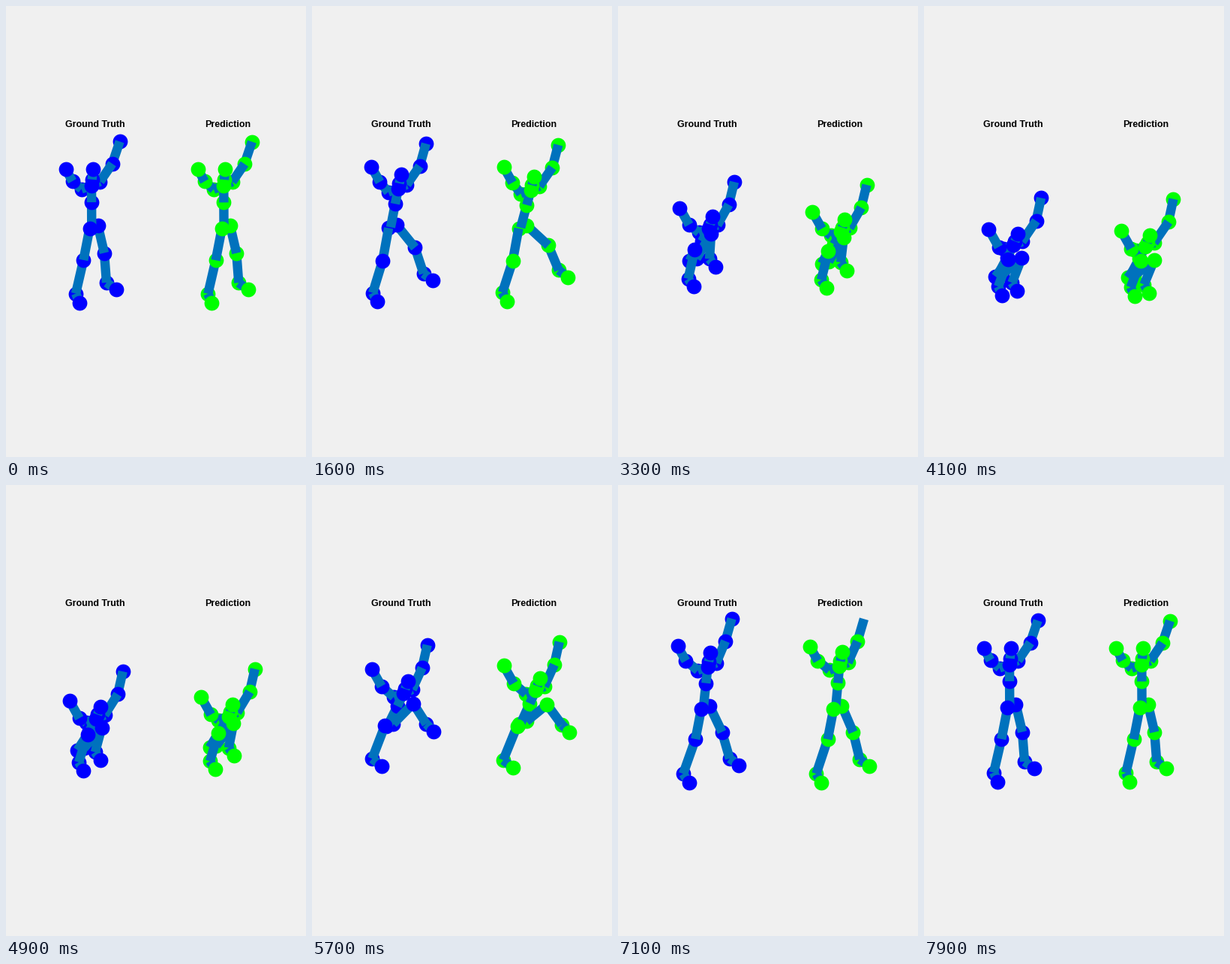
Write a matplotlib script that moves like this. It is 400 px wide and 600 px high and loops after 8 s.

```python
import numpy as np
import matplotlib.pyplot as plt
from matplotlib.animation import FuncAnimation

STEP, FRAMES, HOLD = 100, 80, 400      # ms per frame, frames per loop, still start
PX = 0.72                              # points per pixel at 100 dpi
BONE_COLOR = "#0072BD"


def bump(t, peak, rise, fall):
    """Smooth hill from 0 to 1 and back, times in ms."""
    u = (t - peak) / (rise if t < peak else fall)
    return np.cos(np.pi / 2 * u) ** 2 if abs(u) < 1 else 0.0


def sink(t):
    """How deep the squat is, 0 to 1."""
    return bump(t, 4400, 3250, 2450)


def pose(t):
    """Joint places as x + yj: step out, squat, rise, step back."""
    drop = sink(t)
    mid = 4 * drop * (1 - drop)
    out = bump(t, 2250, 1230, 1150)
    back = bump(t, 6100, 1250, 1850)
    stride = out + back
    sway = bump(t, 7000, 1400, 800)
    spread = 1 - (1 - drop) * (1 - out) * (1 - back)

    p = {}
    # torso and head
    mass = 113 + 238.5j + (5 + 82j) * drop + (4.5 - 4j) * mid + 2j * out
    mass += (2 + 7j) * back + 5 * sway
    p["chest"] = mass + 1
    p["head"] = mass + 3 - 22j + (4 + 7j) * spread
    p["neck"] = p["chest"] + 0.35 * (p["head"] - p["chest"])
    p["hip_l"] = (111.5 + 296j + (-16 + 66j) * drop - (5 + 8j) * mid
                  - (17 + 5j) * out + (-1 + 4j) * back)
    p["hip_r"] = p["hip_l"] + 11 - 4j + (-2.5 + 1.5j) * drop
    p["root"] = p["hip_l"] + 0.25 * (p["hip_r"] - p["hip_l"])
    p["spine"] = p["chest"] + 0.4 * (p["root"] - p["chest"])

    # arms: the hands lead, the elbows hang from them
    p["sh_l"], p["sh_r"] = mass - 12.4 + 5j, mass + 12.4 - 5j
    p["hand_l"] = (79.5 + 217j + (7 + 82.5j) * drop - (3 + 12j) * mid
                   - 10j * out + 3j * back - 4j * sway)
    p["elbow_l"] = p["hand_l"] + 9 + 16j + (4.5 + 8j) * spread
    p["hand_r"] = (151.7 + 180.3j + (4.5 + 77j) * drop - 4.5j * mid
                   + 3j * back - 4j * sway)
    p["elbow_r"] = p["hand_r"] - 10 + 29.5j + (3.5 + 1j) * spread

    # left leg pushes back, right leg swings out
    p["knee_l"] = (103.3 + 338j + (10 + 1j) * drop - (10.5 + 19j) * mid
                   + (-17 + 9j) * out)
    p["ankle_l"] = (93 + 382.5j + (6.5 - 8j) * drop - (5 + 18j) * mid
                    + (-25 + 6j) * out + (-14 + 4j) * back)
    p["toe_l"] = p["ankle_l"] + 5 + 12j + (3 - 2j) * mid + 6 * back
    p["knee_r"] = 131 + 328.5j + 10.5j * drop - (9.5 + 43j) * mid + 17.5 * stride
    p["ankle_r"] = (134 + 368j + (-17 + 4j) * drop - 45j * mid
                    + (34 - 9.5j) * stride)
    p["toe_r"] = p["ankle_r"] + 12.5 + 9j + (-6 + 2j) * drop
    return p


def leg(side, raised):
    parts = "ankle knee-ankle ankle-toe "
    parts += "hip-knee knee toe" if raised else "knee hip-knee hip toe"
    return ["-".join(f"{j}_{side}" for j in part.split("-")) for part in parts.split()]


ARMS = ("hand_r elbow_r-hand_r elbow_r sh_r sh_r-elbow_r sh_l sh_l-elbow_l "
        "chest-sh_r chest-sh_l spine-chest chest-neck chest neck neck-head "
        "elbow_l elbow_l-hand_l hand_l head").split()


def paint_order(depth):
    """Names from back to front; lifted knees come before the body."""
    up_l, up_r = depth > 0.035, depth > 0.2
    order = ["hip_l"] * up_l + ["hip_r"] * up_r
    order += [] if up_r else leg("r", False)
    order += ["spine-root"]
    order += [] if up_l else leg("l", False)
    order += ["spine"] + ARMS
    order += leg("r", True) if up_r else []
    order += leg("l", True) if up_l else []
    return order


fig = plt.figure(figsize=(4, 6), dpi=100, facecolor="#f0f0f0")
ax = fig.add_axes([0, 0, 1, 1])
ax.set(xlim=(0, 400), ylim=(600, 0))
ax.axis("off")


class Figure:
    def __init__(self, color, title, x, shift=0, lead=0, top=0):
        self.shift, self.lead, self.top = shift, lead, top
        self.parts = {}
        for name in paint_order(0):
            if "-" in name:
                style = dict(color=BONE_COLOR, lw=12.4 * PX, solid_capstyle="butt")
            else:
                style = dict(color=color, marker="o", ms=19.8 * PX, mew=0, ls="")
            self.parts[name], = ax.plot([], [], **style)
        ax.text(x, 161, title, ha="center", va="baseline", color="black",
                family="Liberation Sans", weight="bold", size=12.5 * PX)

    def draw(self, t):
        t += self.lead
        joints = pose(t)
        for z, name in enumerate(paint_order(sink(t))):
            part = self.parts[name]
            pts = np.array([joints[j] for j in name.split("-")]) + self.shift
            part.set_data(pts.real, pts.imag)
            part.set_zorder(3 + z)
            if "-" not in name:        # markers beyond the plot limit vanish
                part.set_visible(pts[0].imag > self.top)


# the prediction runs one step ahead
figures = [Figure("#0000ff", "Ground Truth", 118.8),
           Figure("#00ff00", "Prediction", 295.3,
                  shift=176.3 + 0.3j, lead=STEP, top=179)]


def update(i):
    for f in figures:
        f.draw(max(i * STEP, HOLD))
    return []


anim = FuncAnimation(fig, update, frames=FRAMES, interval=STEP,
                     repeat=True, repeat_delay=0, blit=False)
plt.show()
```
